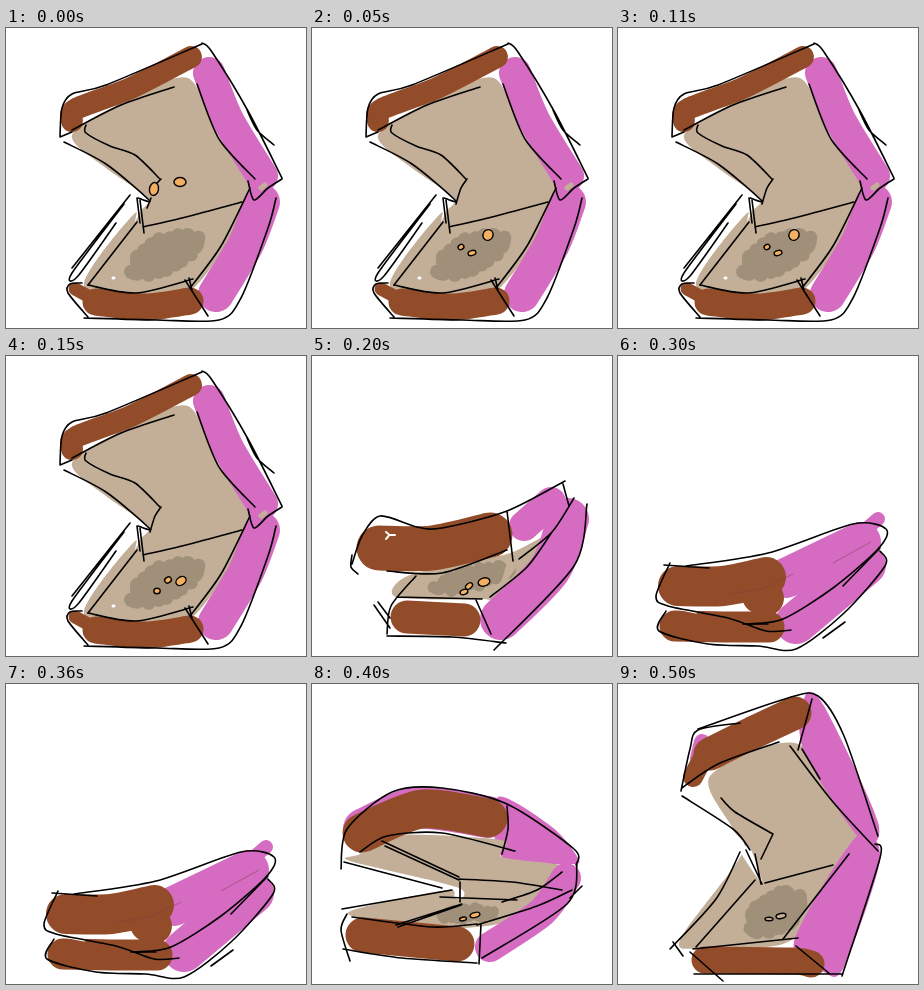
Write an HTML page that moves like this. It is 300 px wide and 300 px high and loops after 550 ms.

```html
<!DOCTYPE html>
<html>
<head>
<meta charset="utf-8">
<style>
html, body { margin: 0; width: 100%; height: 100%; overflow: hidden; background: #fff; }
svg { display: block; width: 300px; height: 300px; }
path, ellipse { stroke-linejoin: round; stroke-linecap: round; }
</style>
</head>
<body>
<svg viewBox="0 0 300 300"></svg>
<script>
const BROWN = "#934c29", PINK = "#d66cc2", TAN = "#c3ae97", DARK = "#a09079", SEED = "#f4b060";

// Smooth curve through "x,y" key points; "/" starts a new stroke.
function curve(text, closed) {
  return text.split("/").map(stroke => {
    const p = stroke.trim().split(/\s+/).map(s => s.split(",").map(Number));
    const n = p.length;
    const at = i => closed ? p[(i + n) % n] : p[Math.max(0, Math.min(n - 1, i))];
    let d = "M" + p[0];
    for (let i = 0; i < (closed ? n : n - 1); i++) {
      const [a, b, c, e] = [at(i - 1), at(i), at(i + 1), at(i + 2)];
      const c1 = b.map((v, k) => v + (c[k] - a[k]) / 7);
      const c2 = c.map((v, k) => v - (e[k] - b[k]) / 7);
      d += `C${c1} ${c2} ${c}`;
    }
    return d;
  }).join("");
}
const fill = (color, text) => `<path fill="${color}" d="${curve(text, true)}"/>`;
const brush = (color, width, text) =>
  `<path fill="none" stroke="${color}" stroke-width="${width}" d="${curve(text)}"/>`;
const ink = text => brush("#000", 1.6, text);
const oval = (x, y, rx, ry, turn = 0, color = SEED) =>
  `<ellipse fill="${color}" stroke="#000" stroke-width="1.4" cx="${x}" cy="${y}" rx="${rx}" ry="${ry}" transform="rotate(${turn} ${x} ${y})"/>`;

let seed = 7;
const random = () => (seed = seed * 16807 % 2147483647) / 2147483647;

// Zigzag of a fat brush that fills a tilted ellipse.
function scribble(x, y, w, h, turn, width = 14) {
  const points = [], n = 16, tilt = turn * Math.PI / 180;
  for (let i = 0; i <= n; i++) {
    const u = 2 * i / n - 1;
    const dx = w / 2 * u + random() * 4;
    const dy = (i % 2 ? 1 : -1) * h / 2 * Math.sqrt(1 - u * u) + random() * 4 - 2;
    points.push([x + dx * Math.cos(tilt) - dy * Math.sin(tilt), y + dx * Math.sin(tilt) + dy * Math.cos(tilt)]);
  }
  return brush(DARK, width, points.join(" "));
}

const wide = [
  fill(TAN, "66,107 120,73 182,50 212,110 247,155 238,175 137,199 134,184 142,170 100,140"),
  fill(TAN, "128,186 137,199 239,174 190,258 140,266 78,257"),
  scribble(157, 227, 72, 28, -25),
  brush(PINK, 32, "203,45 222,92 256,148"),
  brush(PINK, 36, "256,174 240,216 210,266"),
  brush(TAN, 5, "255,160 259,157"),
  brush(BROWN, 22, "66,93 70,81 125,60 185,29"),
  brush(BROWN, 27, "90,274 140,279 184,273"),
  brush(BROWN, 13, "69,261 82,268"),
  ink("54,108 56,80 66,66 100,57 196,16 / 196,15 206,24 242,83 276,150 / 241,82 251,102 268,117 / 276,151 262,160 248,172 242,153"),
  ink("54,109 66,104 / 66,102 115,77 168,59 / 80,97 80,105 104,118 129,127 154,151 / 58,114 100,136 143,172 132,170"),
  ink("191,56 213,111 249,151 / 134,172 138,205 / 131,170 134,195 / 137,199 180,189 236,174 / 131,194 82,257"),
  ink("244,160 215,218 184,260 / 118,176 66,245 72,248 110,195 / 124,167 66,240 / 82,257 130,265 187,251 / 179,252 202,288 / 183,250 186,262"),
  ink("270,170 262,200 235,270 213,292 150,292 78,290 / 82,289 62,265 64,256 76,255"),
  brush("#fff", 3, "107,250 108,250")
].join("");
const mouth = ink("155,151 149,160 144,176");

const biting = [
  fill(TAN, "98,219 195,198 240,178 190,238 165,243 84,241"),
  scribble(158, 223, 76, 14, -14, 12),
  brush(PINK, 30, "212,170 239,146"),
  brush(PINK, 42, "256,163 238,213 189,263"),
  fill(TAN, "198,200 214,196 190,230"),
  brush(BROWN, 45, "67,192 120,192 178,179"),
  brush(BROWN, 33, "95,261 152,264"),
  brush("#fff", 2, "74,176 77,179 74,183 / 77,179 83,179"),
  ink("40,208 50,180 68,160 105,171 130,172 195,155 253,125 / 251,128 257,150 / 195,155 201,205 / 40,199 39,211 46,218"),
  ink("75,215 130,217 195,194 / 240,176 215,211 178,241 / 262,142 240,176 207,203 / 275,148 262,210 182,294"),
  ink("75,280 140,281 194,287 / 85,241 170,243 / 164,244 179,278 / 104,220 79,250 75,278 / 62,249 78,272 / 66,246 78,262"),
  oval(172, 226, 6, 4, -15), oval(157, 230, 4, 2.5, -40), oval(152, 236, 4, 2.5, -20)
].join("");

const shut = [
  brush(PINK, 40, "168,222 243,186"),
  brush(PINK, 42, "178,267 247,209"),
  brush(PINK, 14, "240,180 260,163"),
  brush(BROWN, 40, "60,230 105,230 148,221"),
  brush(BROWN, 36, "142,240 148,242"),
  brush(BROWN, 31, "57,270 105,271 151,271"),
  brush("#fff", 3, "58,252 78,256"),
  `<g opacity=".5">${brush("#7b3d45", 1, "112,238 145,232 175,218 / 215,207 253,186")}</g>`,
  ink("46,209 91,212 / 68,210 150,197 235,168 268,173 260,193 215,232 165,263 130,268"),
  ink("52,207 38,240 50,250 110,262 148,275 173,274 / 48,255 41,275 90,288 140,290 178,293 225,258 267,210 262,195"),
  ink("262,192 225,230 / 205,282 227,266 / 125,268 150,268")
].join("");

const opening = [
  fill(PINK, "186,113 240,143 266,174 258,180 190,173"),
  fill(TAN, "48,170 75,151 189,156 190,173 255,183 235,205 150,222 147,204 38,177"),
  fill(TAN, "36,229 135,206 150,215 248,190 200,236 120,244"),
  scribble(153, 230, 52, 10, -4, 10),
  brush(PINK, 30, "254,194 230,228 178,263"),
  brush(PINK, 42, "52,145 105,124 176,133"),
  brush(BROWN, 39, "50,149 110,125 176,134"),
  brush(BROWN, 35, "51,251 145,260"),
  ink("29,185 35,145 80,108 130,104 195,120 262,165 264,181 / 48,168 75,152 130,149 203,167 / 195,122 196,145 190,170"),
  ink("70,157 147,193 / 73,162 147,196 / 147,195 200,198 250,206 / 148,198 148,218 / 128,213 205,216 / 32,178 130,204"),
  ink("250,188 225,206 190,218 / 260,206 225,222 165,241 / 84,241 150,220 / 86,243 149,221 / 30,225 140,206 / 35,230 29,246 38,277"),
  ink("31,265 90,274 165,279 / 169,240 167,280 / 265,180 255,220 170,274 / 258,214 270,202 / 40,233 120,243 165,240"),
  oval(163, 231, 5, 2.5, -15), oval(151, 235, 3.5, 1.8, -10)
].join("");

const rising = [
  fill(TAN, "92,92 180,60 240,150 200,225 165,260 80,265 63,254 124,170 115,145"),
  fill("#fff", "122,167 132,164 144,199"),
  scribble(156, 229, 56, 32, -35),
  fill(PINK, "187,12 206,22 260,138 243,156 185,65"),
  fill(PINK, "238,153 262,175 226,283 206,288 176,258"),
  brush(PINK, 16, "84,58 80,74"),
  brush(BROWN, 33, "92,70 130,51 177,29"),
  brush(BROWN, 20, "75,93 86,72"),
  brush(BROWN, 27, "87,276 175,277 193,280"),
  ink("63,107 72,65 80,46 122,39 / 80,45 170,14 200,12 226,52 260,152 / 64,104 100,80 161,58 / 194,15 180,66"),
  ink("172,62 215,118 260,167 / 184,65 202,95 / 64,112 115,145 132,166 / 103,114 117,128 155,150 / 155,150 143,175"),
  ink("128,166 144,200 / 137,170 143,200 / 147,199 215,181 / 122,168 98,215 52,265 / 137,196 78,263 / 231,170 165,255"),
  ink("75,265 180,254 / 178,262 212,290 / 257,160 262,174 224,292 / 72,268 105,297 / 76,290 225,290 / 55,258 65,272"),
  oval(151, 235, 4, 1.8, 0, TAN), oval(163, 232, 5, 2.5, -10, TAN)
].join("");

// [end time in ms, drawing]
const poses = [
  [50, wide + ink("155,151 148,158 / 145,170 141,180") + oval(148, 161, 4.5, 6.5, 10) + oval(174, 154, 6, 4.5)],
  [150, wide + mouth + oval(176, 207, 5, 5.5, 30) + oval(149, 219, 3, 2.5, -30) + oval(160, 225, 4, 2.5, -15)],
  [200, wide + mouth + oval(175, 225, 5.5, 4, -35) + oval(162, 224, 3.5, 2.8, -30) + oval(151, 235, 3.2, 2.8)],
  [300, biting],
  [400, shut],
  [500, opening],
  [550, rising]
];

const svg = document.querySelector("svg");
svg.innerHTML = poses.map(([, art]) => `<g>${art}</g>`).join("");
const start = performance.now();
function draw() {
  const t = (performance.now() - start) % 550;
  const now = poses.findIndex(([end]) => t < end);
  [...svg.children].forEach((g, i) => g.style.display = i === now ? "" : "none");
  requestAnimationFrame(draw);
}
draw();
</script>
</body>
</html>
```
